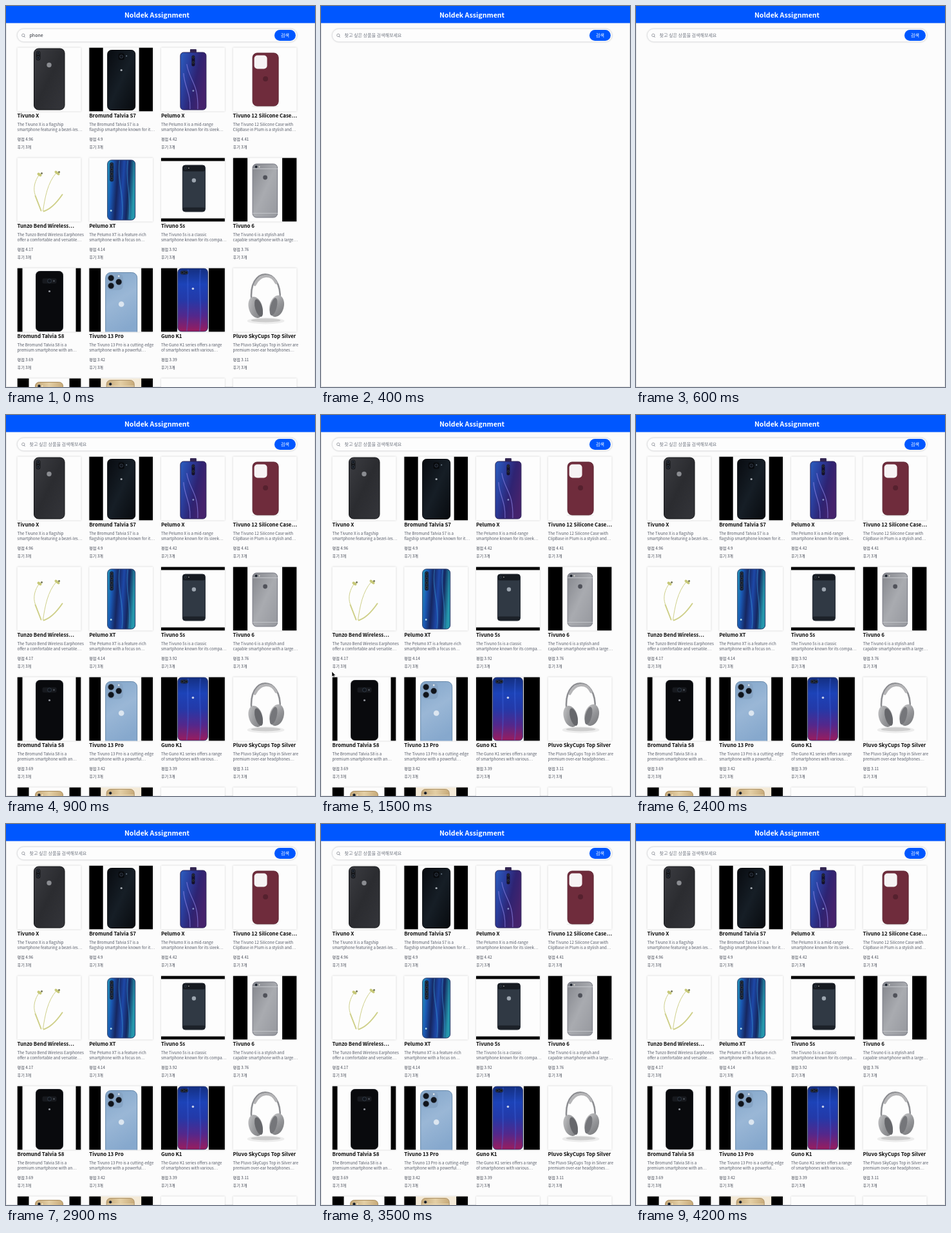
Recreate the animation shown at these times as an HTML page. Size 480 by 591 pixels, loop 4300 ms.

```html
<!DOCTYPE html>
<html>
<head>
<meta charset="utf-8">
<style>
html, body { margin: 0; width: 100%; height: 100%; overflow: hidden; background: #fcfcfc; }
#stage { display: block; width: 480px; height: 591px; font-family: 'Noto Sans CJK JP', 'Noto Sans CJK KR', 'Noto Sans', sans-serif; }
.brand { font-size: 10.6px; font-weight: 700; fill: #fff; text-anchor: middle; }
.field { font-size: 7.04px; }
.name { font-size: 7.92px; font-weight: 700; fill: #080808; }
.note { font-size: 6.16px; fill: #535865; }
.score { font-size: 6.16px; fill: #414652; }
.raised { filter: drop-shadow(0 .8px 1.3px #0003); }
</style>
</head>
<body>
<svg id="stage" viewBox="0 0 480 591"></svg>
<script>
const LOOP = 4300;
const BLUE = '#0057ff';

const rect = (x, y, w, h, fill, r = 0, more = '') =>
  `<rect x="${x}" y="${y}" width="${w}" height="${h}" rx="${r}" fill="${fill}" ${more}/>`;
const dot = (x, y, r, fill, more = '') => `<circle cx="${x}" cy="${y}" r="${r}" fill="${fill}" ${more}/>`;
const oval = (x, y, rx, ry, fill, turn = 0) =>
  `<ellipse cx="${x}" cy="${y}" rx="${rx}" ry="${ry}" fill="${fill}" transform="rotate(${turn} ${x} ${y})"/>`;
const line = (d, stroke, width = 1) =>
  `<path d="${d}" fill="none" stroke="${stroke}" stroke-width="${width}" stroke-linecap="round"/>`;
const text = (x, y, cls, str, more = '') => `<text x="${x}" y="${y}" class="${cls}" ${more}>${str}</text>`;
const gradient = (id, x2, y2, colors) =>
  `<linearGradient id="${id}" x2="${x2}" y2="${y2}">${colors.map((c, i) =>
    `<stop offset="${i / (colors.length - 1)}" stop-color="${c}"/>`).join('')}</linearGradient>`;
const sideBars = (width) => rect(0, 0, width, 99, '#000') + rect(99 - width, 0, width, 99, '#000');
const body = (x, y, w, h, fill, edge, r = 6) =>
  rect(x, y, w, h, fill, r, `stroke="${edge}" stroke-width="1"`);
const lens = (x, y, r = 2) => dot(x, y, r, '#10141b', 'stroke="#465160" stroke-width=".6"');

const defs = `<defs>
  ${gradient('slate', 1, 1, ['#3c3d42', '#2b2c30', '#34353a'])}
  ${gradient('ink', 1, 1, ['#080b10', '#161e26', '#080b0f'])}
  ${gradient('violet', 1, .5, ['#2c5fc0', '#2a3f9f', '#2f2372', '#45236c'])}
  ${gradient('ocean', 1, .15, ['#25a0bd', '#1a58b4', '#16265f', '#1d48a8', '#15275f', '#2496ac'])}
  ${gradient('steel', 1, 1, ['#85878d', '#a9abb0', '#96989e'])}
  ${gradient('sky', .3, 1, ['#83a6ca', '#9ab7d6', '#86a8cd'])}
  ${gradient('dusk', 0, 1, ['#142f80', '#1c43b8', '#2439a8', '#53288c', '#9a1c5d'])}
  ${gradient('silver', 1, 1, ['#c9c9ca', '#96979a', '#77787b'])}
  ${gradient('gold', 1, 0, ['#c4a777', '#e4cfa5', '#c7aa79'])}
</defs>`;

const art = [
  body(26, 1.5, 47.5, 95, 'url(#slate)', '#131417', 7) + rect(29, 5, 7, 15, '#17181b', 3.5) +
    lens(32.5, 8.5) + lens(32.5, 16) + dot(49.5, 27, 3.7, '#8a8c91'),
  sideBars(21.5) + body(28.5, 4, 43, 93, 'url(#ink)', '#05070a') + rect(45.5, 9, 9, 10, '#07090c', 2.5) +
    lens(50, 14, 2.6) + dot(58, 13, 1, '#718090') + dot(50, 35, 1.6, '#a7adb3'),
  rect(45, 2.5, 10, 8, '#332652', 1) + body(30, 7.5, 40, 89, 'url(#violet)', '#2b2358', 5) +
    line('M40 26C44 52 58 54 57 95M35 40C36 60 46 70 45 95', '#8f86e8aa', 1.2) +
    rect(47.5, 12, 5, 17, '#14112a', 2.5) + lens(50, 15, 1.5) + lens(50, 23, 1.5) + dot(50, 67, 1.4, '#7f8cc2'),
  oval(50, 91, 21, 2, '#0001') +
    body(30.5, 8.5, 40, 82, '#6f2c3c', '#5c2431', 7) + rect(33, 12, 20, 21, '#f6f3f4', 5) +
    dot(50.5, 48.5, 4, '#55212e'),
  line('M35 25C27 35 24 48 28 58L37 82M61 23C47 38 43 62 40 82', '#cfd08a', 1) +
    line('M28 59L37 82M41 83C51 80 61 70 70 57', '#cfd08a', 2) +
    line('M33 25L36 27M60 22L64 25', '#c6c878', 4) + dot(38, 24, 1.5, '#77785a') + dot(65, 22, 1.5, '#77785a'),
  body(28.5, 3.5, 43, 93, 'url(#ocean)', '#243568') +
    line('M47 5C43 36 55 57 51 95M60 5C56 39 66 61 62 95', '#3a9ee266', 1.8) +
    rect(32, 7, 6, 30, '#15243d', 3) + [11, 18, 25, 32].map(y => lens(35, y, 1.8)).join('') +
    dot(34, 82, 1.4, '#a9d6e4'),
  rect(0, 0, 99, 5, '#000') + rect(0, 94, 99, 5, '#000') +
    body(33.5, 11.5, 35, 72, '#303944', '#20262e', 4) + rect(34, 12, 34, 9, '#171b21', 2) +
    rect(34, 77, 34, 6, '#1c2128', 2) + lens(38, 16, 1.6) + dot(43, 16, .8, '#c4c4b8') + dot(51, 35, 3.2, '#9da6b0'),
  sideBars(22.5) + body(30.5, 9.5, 38.5, 83, 'url(#steel)', '#747680') +
    line('M31 17H69M31 86H69', '#c7c9cd', .9) + lens(36, 14, 1.8) + dot(41, 14, .9, '#ececdf') +
    dot(50, 30.5, 3.4, '#50525a'),
  sideBars(8) + body(29, 5, 42, 93, '#090a0d', '#24262b') + rect(39, 16, 22, 8, '#17191e', 2) +
    lens(50, 20, 3) + dot(57, 20, 1.2, '#555a62') + dot(50, 36, 1.6, '#8f9298'),
  sideBars(18) + body(25.5, 7, 49, 99, 'url(#sky)', '#6788aa', 8) + rect(27.5, 9, 25, 25, '#86a4c4', 6) +
    lens(34, 15.5, 4.5) + lens(34, 27.5, 4.5) + lens(46, 21.5, 4.5) + dot(46, 12.5, 1.3, '#e9eef2') +
    dot(50, 56, 4.3, '#dce6f0'),
  sideBars(25) + body(26, .5, 46.5, 98, 'url(#dusk)', '#26346c') +
    line('M42 3C40 32 44 62 40 97M61 3C58 37 64 64 60 97', '#466de355', 2) +
    rect(30, 4, 12, 6, '#101a3a', 3) + lens(33, 7) + lens(39, 7) + dot(49.5, 32, 1.8, '#c5cfe9'),
  oval(51, 82, 29, 5, '#0001') + oval(51, 81, 23, 3, '#0002') +
    line('M29 52C22 -4 77 -4 73 50', '#8d8e92', 2.6) + line('M34 26C42 9 60 8 67 23', '#b5b5b7', 4) +
    oval(35, 61, 10.5, 17, 'url(#silver)', -16) + oval(40, 62, 5.5, 14, '#66676b', -16) +
    oval(68, 59, 11, 17, 'url(#silver)', 14) + oval(63, 60, 5, 14, '#75767a', 14),
  sideBars(18) + body(28, 6, 43, 91, 'url(#gold)', '#a88b5d') + lens(34, 12) + dot(39, 12, 1, '#fff3d5'),
  rect(0, 0, 99, 99, '#f4ead8') + sideBars(18) + body(27, 3, 43, 94, 'url(#gold)', '#ac9268') +
    lens(33, 9) + line('M28 12H69', '#e8d7b6'),
  '', ''
];

const products = [
  ['Tivuno X', 'The Tivuno X is a flagship', 'smartphone featuring a bezel-les…', 4.96],
  ['Bromund Talvia S7', 'The Bromund Talvia S7 is a', 'flagship smartphone known for it…', 4.9],
  ['Pelumo X', 'The Pelumo X is a mid-range', 'smartphone known for its sleek…', 4.42],
  ['Tivuno 12 Silicone Case…', 'The Tivuno 12 Silicone Case with', 'ClipBase in Plum is a stylish and…', 4.41],
  ['Tunzo Bend Wireless…', 'The Tunzo Bend Wireless Earphones', 'offer a comfortable and versatile…', 4.17],
  ['Pelumo XT', 'The Pelumo XT is a feature-rich', 'smartphone with a focus on…', 4.14],
  ['Tivuno 5s', 'The Tivuno 5s is a classic', 'smartphone known for its compa…', 3.92],
  ['Tivuno 6', 'The Tivuno 6 is a stylish and', 'capable smartphone with a large…', 3.76],
  ['Bromund Talvia S8', 'The Bromund Talvia S8 is a', 'premium smartphone with an…', 3.69],
  ['Tivuno 13 Pro', 'The Tivuno 13 Pro is a cutting-edge', 'smartphone with a powerful…', 3.42],
  ['Guno K1', 'The Guno K1 series offers a range', 'of smartphones with various…', 3.39],
  ['Pluvo SkyCups Top Silver', 'The Pluvo SkyCups Top in Silver are', 'premium over-ear headphones…', 3.11]
];

const card = (picture, i) => {
  const x = 17.5 + (i % 4) * 111.7, y = 64.5 + Math.floor(i / 4) * 171;
  const [name, first, second, score] = products[i] || [];
  const copy = name ? text(0, 108, 'name', name) + text(0, 121, 'note', first) + text(0, 129, 'note', second) +
    text(0, 144.6, 'score', `평점 ${score}`) + text(0, 156.5, 'score', '후기 3개') : '';
  return `<g transform="translate(${x} ${y})">${rect(0, 0, 99, 99, '#fdfdfd', 0, 'class="raised"')}
    <svg width="99" height="99" overflow="hidden">${picture}</svg>${copy}</g>`;
};

const stage = document.getElementById('stage');
stage.innerHTML = defs + rect(0, 0, 480, 591, '#fcfcfc') +
  line('M.5 27V590.5H479.5V27', '#e6e7e9') +
  rect(0, 0, 480, 26.5, BLUE) + text(234.5, 17.6, 'brand', 'Noldek Assignment') +
  rect(17.5, 35.5, 434.5, 20, '#fdfdfd', 10, 'class="raised" stroke="#dedfe2" stroke-width=".6"') +
  dot(26.8, 45.4, 2.2, 'none', 'stroke="#777c86" stroke-width=".7"') + line('M28 47L29.4 48.6', '#777c86', .7) +
  text(36.5, 48.4, 'field', '', 'id="query"') +
  rect(417, 37, 33, 17, BLUE, 8.5) + text(433.5, 48.2, 'field', '검색', 'fill="#fff" text-anchor="middle" font-weight="500"') +
  `<g id="results">${art.map(card).join('')}</g>
  <path id="cursor" d="M0 0V8L1.8 6.4L3 9L4.3 8.4L3.1 5.9H5.6Z" fill="#000" stroke="#fff" stroke-width=".5"/>`;

const [query, results, cursor] = ['query', 'results', 'cursor'].map(id => document.getElementById(id));
const show = (el, visible) => el.setAttribute('visibility', visible ? 'visible' : 'hidden');

function draw(ms) {
  const t = Math.floor(ms % LOOP / 100) * 100;
  const typed = t < 200;
  query.textContent = typed ? 'phone' : '찾고 싶은 상품을 검색해보세요';
  query.setAttribute('fill', typed ? '#292d35' : '#737883');
  show(results, typed || t >= 800);
  show(cursor, t >= 1300 && t < 1900);
  // The pointer edges in, then sweeps off to the right.
  const x = t <= 1500 ? 17 * ((t - 1300) / 200) ** 2 : 17 + (t - 1500) * 1.52;
  cursor.setAttribute('transform', `translate(${x} 398)`);
}

const start = performance.now();
function tick() {
  draw(performance.now() - start);
  requestAnimationFrame(tick);
}
tick();
</script>
</body>
</html>
```
